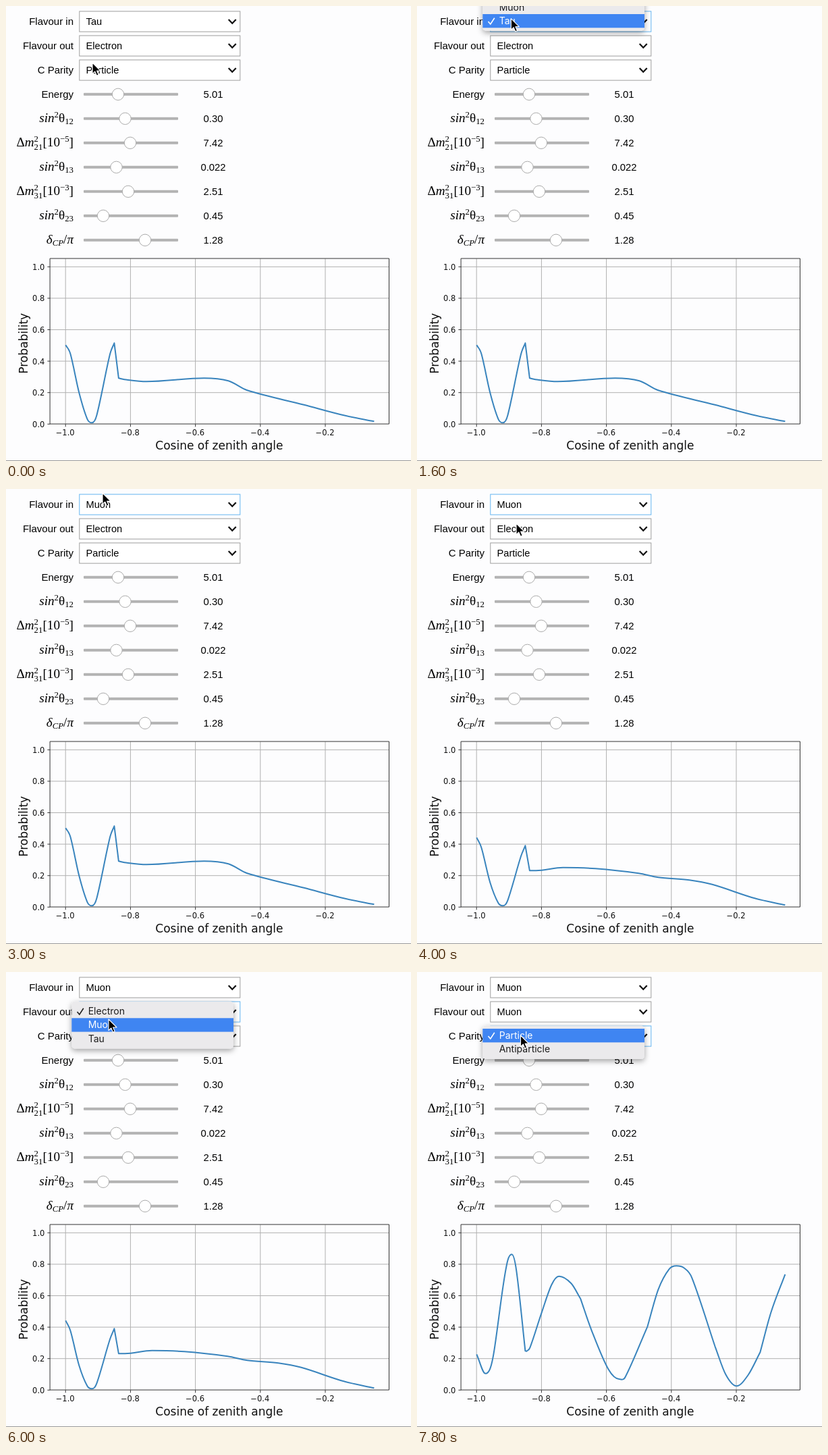
An HTML page that plays this animation: 600 px wide and 674 px high, repeating every 8 s.

```html
<!DOCTYPE html>
<html lang="en">
<head>
<meta charset="utf-8">
<title>Oscillation probability</title>
<style>
html, body { margin: 0; width: 100%; height: 100%; overflow: hidden; background: #fdfdfe; }
svg { display: block; }
.ui { font: 15px "Liberation Sans", Arial, sans-serif; }
.math { font: 19.2px "Liberation Serif", "Times New Roman", serif; }
.small { font-size: 12.8px; }
.plot { font: 11.5px "DejaVu Sans", sans-serif; fill: #111; }
.title { font-size: 17px; }
.menu { font: 14px Inter, sans-serif; }
</style>
</head>
<body>
<svg id="stage" width="600" height="674" viewBox="0 0 600 674">
  <defs>
    <filter id="shadow" x="-10%" y="-30%" width="120%" height="170%">
      <feDropShadow dx="0" dy="3" stdDeviation="4.5" flood-opacity=".36"/>
    </filter>
  </defs>
</svg>
<script>
const LOOP = 8000, STEP = 200, ROW = 36;
const stage = document.getElementById('stage');

function add(parent, tag, attrs = {}, text = '') {
  const el = document.createElementNS('http://www.w3.org/2000/svg', tag);
  set(el, attrs);
  el.textContent = text;
  parent.append(el);
  return el;
}
function set(el, attrs) {
  for (const key in attrs) el.setAttribute(key, attrs[key]);
}

const ui = add(stage, 'g', { class: 'ui' });
const label = (y, text) => add(ui, 'text', { x: 100, y, 'text-anchor': 'end' }, text);

// Dropdowns
const selects = ['Flavour in', 'Flavour out', 'C Parity'].map((name, i) => {
  const y = 8 + ROW * i;
  label(y + 20.2, name);
  const box = add(ui, 'rect', { x: 108.8, y: y - .1, width: 238, height: 30.2, fill: '#fff' });
  const value = add(ui, 'text', { x: 118.6, y: y + 20.2, 'font-size': 14.6 });
  add(ui, 'path', { d: `M329.7 ${y + 12}l5.5 5.7l5.5 -5.7`, fill: 'none', stroke: '#111', 'stroke-width': 2.3 });
  return { y, box, value };
});

// Math markup: *italic*, ^{raised}, _{lowered}
function mathLabel(y, markup) {
  const text = add(ui, 'text', { class: 'math', x: 100, y, 'text-anchor': 'end' });
  let level = 0;
  for (const [, mark, body, plain] of markup.matchAll(/([*^_])\{?(.+?)[}*]|([^*^_]+)/g)) {
    const stacked = mark === '_' && level < 0;
    const next = mark === '^' ? -7 : stacked ? 5 : mark === '_' ? 3 : 0;
    add(text, 'tspan', {
      dx: stacked ? -6.4 : 0,
      dy: next - level,
      class: next ? 'small' : '',
      'font-style': mark === '*' || body === 'CP' ? 'italic' : 'normal'
    }, body || plain);
    level = next;
  }
}

// Sliders: [label, knob x, value]
[
  ['Energy', 166, '5.01'],
  ['*sin*^{2}θ_{12}', 176.5, '0.30'],
  ['Δ*m*^{2}_{21}[10^{−5}]', 184, '7.42'],
  ['*sin*^{2}θ_{13}', 163.5, '0.022'],
  ['Δ*m*^{2}_{31}[10^{−3}]', 181, '2.51'],
  ['*sin*^{2}θ_{23}', 144, '0.45'],
  ['*δ*_{CP}/*π*', 206, '1.28']
].forEach(([name, knob, value], i) => {
  const y = 130.8 + ROW * i;
  (i ? mathLabel : label)(y + 5.5, name);
  add(ui, 'rect', { x: 115, y: y - 2, width: 140, height: 4, rx: 1, fill: '#b3b3b3' });
  add(ui, 'circle', { cx: knob, cy: y, r: 8.7, fill: '#fff', stroke: '#ababab' });
  add(ui, 'text', { x: 307, y: y + 5.4, 'font-size': 14.8, 'text-anchor': 'middle' }, value);
});

// Chart
const chart = add(stage, 'g', { class: 'plot', transform: 'translate(.4 .3)' });
const rule = (d, stroke = '#333') => add(chart, 'path', { d, stroke, fill: 'none' });
for (let i = 0; i < 6; i++) {
  const x = 87.8 + 96.2 * i, y = 619 - 46.6 * i;
  if (i < 5) {
    rule(`M${x} 374V619`, '#b0b0b0');
    rule(`M${x} 619v4`);
    add(chart, 'text', { x: x - .5, y: 636.2, 'text-anchor': 'middle' }, '−' + (1 - i / 5).toFixed(1));
  }
  if (i) rule(`M65 ${y}H567`, '#b0b0b0');
  rule(`M65 ${y}h-4`);
  add(chart, 'text', { x: 57, y: y + 4.5, 'text-anchor': 'end' }, (i / 5).toFixed(1));
}
const curve = add(chart, 'path', { fill: 'none', stroke: '#3984bd', 'stroke-width': 2, 'stroke-linejoin': 'round' });
rule('M64.7 373.7H567.1V618.8H64.7Z');
add(chart, 'text', { class: 'title', x: 315.5, y: 656.8, 'text-anchor': 'middle' }, 'Cosine of zenith angle');
add(chart, 'text', { class: 'title', transform: 'translate(31.6 499.5) rotate(-90)', 'text-anchor': 'middle' }, 'Probability');
add(stage, 'path', { d: 'M0 673.5H600', stroke: '#999' });

// Smooth curve through [x, y] points, flat at peaks and valleys
function smooth(pts) {
  const rise = (a, b) => (b[1] - a[1]) / (b[0] - a[0]);
  const slope = pts.map((p, i) => {
    const a = pts[i - 1], b = pts[i + 1];
    if (!a || !b) return rise(a || p, b || p);
    return rise(a, p) * rise(p, b) <= 0 ? 0 : rise(a, b);
  });
  return pts.map((p, i) => {
    if (!i) return 'L' + p;
    const a = pts[i - 1], w = (p[0] - a[0]) / 3;
    return `C${a[0] + w},${a[1] + w * slope[i - 1]} ${p[0] - w},${p[1] - w * slope[i]} ${p}`;
  }).join('');
}
const path = (...runs) => runs.map(smooth).join('').replace('L', 'M');

const tauToElectron = path(
  [[88, 502], [95, 515], [108, 573], [120, 611.5], [127, 617], [134, 606], [153.5, 516], [160, 499]],
  [[166.5, 551], [175, 553], [208, 556], [293, 551], [329, 555], [357, 569], [441, 590.5], [500, 606], [545, 615]]);
const muonToElectron = path(
  [[88, 516], [95, 531], [108, 583], [120, 613], [127, 617], [134, 609], [153.5, 544], [160, 528]],
  [[166.5, 565], [176, 565], [216, 560.5], [264, 562], [328, 569], [357, 575], [403, 579], [437, 585.5], [500, 606], [545, 616]]);
const muonToMuon = path(
  [[88, 566], [101, 594.5], [108, 587], [114, 560], [127, 466], [134, 427], [140, 418], [147, 443], [160, 561]],
  [[162, 561.5], [167, 556], [184, 505], [199, 463], [210, 450.5], [228, 461], [242, 484]],
  [[242, 484], [258, 530], [283, 588], [300, 603], [308, 600], [341, 525]],
  [[341, 525], [357, 470], [373, 440], [384, 435], [395, 438], [407, 453], [441, 554]],
  [[441, 554], [457, 596], [473, 613], [490, 597], [508, 563]],
  [[508, 563], [524, 504], [545, 447.5]]);

// Popup menus
function makeMenu(select, items, checked) {
  const row = 20.3, left = 97.3, width = 239.7;
  const { y } = selects[select];
  const first = y + 4 - checked * row;
  const g = add(stage, 'g', { class: 'menu' });
  add(g, 'rect', { x: left, y: first - 4.5, width, height: items.length * row + 9, rx: 5,
    fill: '#ebeaec', filter: 'url(#shadow)' });
  const bar = add(g, 'rect', { x: left, width, height: row, fill: '#3f85f2' });
  const rows = items.map((text, i) => add(g, 'text', { x: 121.7, y: first + i * row + 15.1 }, text));
  const tick = add(g, 'path', { d: `M105.5 ${y + 15}l3.3 4l6 -9.3`, fill: 'none', 'stroke-width': 1.6 });
  return (open, hover) => {
    set(g, { visibility: open ? 'visible' : 'hidden' });
    set(bar, { y: first + hover * row, opacity: hover < 0 ? 0 : 1 });
    rows.forEach((r, i) => set(r, { fill: i === hover ? '#fff' : '#1c1c1c' }));
    set(tick, { stroke: hover === checked ? '#fff' : '#1c1c1c' });
  };
}

// Each choice: menu opens, an item is hovered, blinks, the menu closes, the curve follows
const FLAVOURS = ['Electron', 'Muon', 'Tau'];
const choices = [
  { items: FLAVOURS, from: 2, to: 1, open: 1600, hover: 2200, result: muonToElectron },
  { items: FLAVOURS, from: 0, to: 1, open: 5600, hover: 6000, result: muonToMuon },
  { items: ['Particle', 'Antiparticle'], from: 0, to: 0, open: 7800, hover: LOOP }
];
choices.forEach((c, i) => c.show = makeMenu(i, c.items, c.from));
const BLINK = 200, CLOSE = 400, REDRAW = 1000;

const cursor = add(stage, 'path', {
  d: 'M0 0V16.6L3.8 13L6.5 19.2L9.2 18L6.6 12H12Z',
  fill: '#000', stroke: '#fff', 'stroke-width': 1.1, 'stroke-linejoin': 'round'
});
const stops = [
  [0, 128, 84], [1400, 139, 20], [2000, 140, 16], [2400, 143, 5], [3000, 143, 6],
  [4000, 147, 51], [4400, 147, 51], [6000, 152, 70], [7000, 152, 73], [7800, 153.5, 94]];

function cursorAt(t) {
  const next = stops.findIndex(s => s[0] > t);
  if (next < 0) return stops.at(-1).slice(1);
  const a = stops[next - 1], b = stops[next];
  const u = (t - a[0]) / (b[0] - a[0]);
  return [1, 2].map(k => a[k] + (b[k] - a[k]) * u);
}

function draw(ms) {
  const t = Math.floor(ms % LOOP / STEP) * STEP;
  let focus = t < STEP ? -1 : 1, shape = tauToElectron;
  choices.forEach((c, i) => {
    const age = t - c.hover;
    if (t >= c.open) focus = i;
    if (age >= REDRAW) shape = c.result;
    c.show(t >= c.open && age < CLOSE, age < 0 ? c.from : age < BLINK ? c.to : -1);
    selects[i].value.textContent = c.items[age < CLOSE ? c.from : c.to];
  });
  selects.forEach((s, i) => set(s.box, { stroke: i === focus ? '#64b5f0' : '#9e9e9e' }));
  set(curve, { d: shape });
  set(cursor, { transform: `translate(${cursorAt(t)})` });
}

const start = performance.now();
function tick() {
  draw(Math.max(0, performance.now() - start));
  requestAnimationFrame(tick);
}
tick();
</script>
</body>
</html>
```
